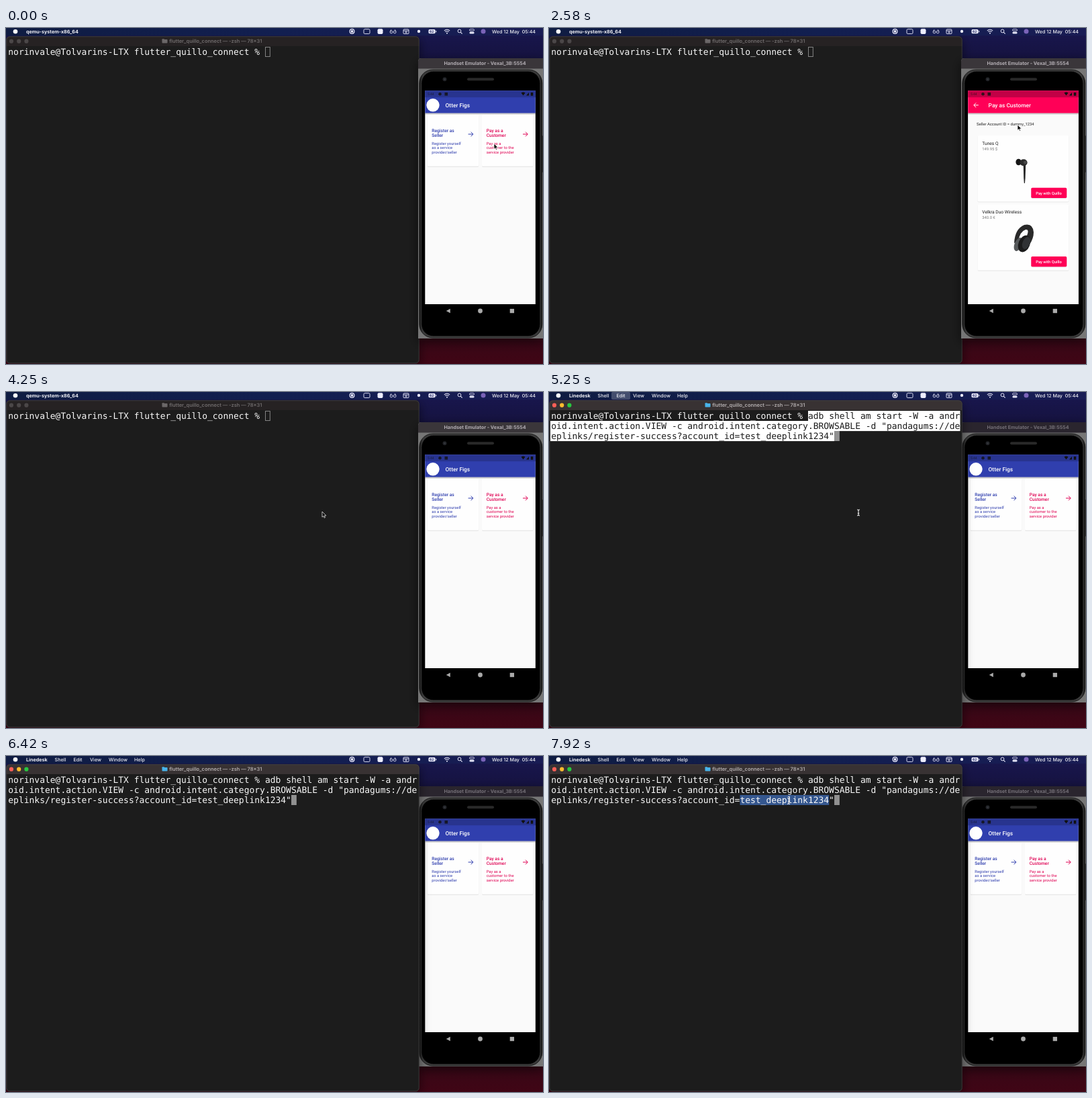
Recreate the animation shown at these times as an HTML page. Size 800 px wide and 500 px high, loop 8 s.

```html
<!DOCTYPE html>
<html lang="en">
<head>
<meta charset="utf-8">
<title>Deep link demo</title>
<style>
  html, body { margin: 0; width: 100%; height: 100%; overflow: hidden; background: #14133f; }
  svg { display: block; width: 800px; height: 500px; }
  text { white-space: pre; text-rendering: geometricPrecision; }
  .ui { font-family: Inter, sans-serif; font-size: 7.2px; font-weight: 500; fill: #f1f1f6; }
  .app { font-family: Roboto, sans-serif; font-size: 5.84px; }
  .mono { font-family: "DejaVu Sans Mono", monospace; font-size: 12.97px; fill: #f8f8f8; }
  .bold { font-weight: 700; }
  .semi { font-weight: 600; }
  .medium { font-weight: 500; }
</style>
</head>
<body>
<svg id="stage" viewBox="0 0 800 500" xmlns="http://www.w3.org/2000/svg">
  <defs>
    <linearGradient id="wall" x2="0" y2="1">
      <stop offset="0" stop-color="#191750"/><stop offset=".1" stop-color="#15123e"/>
      <stop offset=".9" stop-color="#340817"/><stop offset="1" stop-color="#400515"/>
    </linearGradient>
    <linearGradient id="menuFill">
      <stop offset="0" stop-color="#0f1c42"/><stop offset=".5" stop-color="#121f50"/><stop offset="1" stop-color="#191c54"/>
    </linearGradient>
    <linearGradient id="metal">
      <stop offset="0" stop-color="#161616"/><stop offset=".03" stop-color="#3a3a3a"/>
      <stop offset=".97" stop-color="#3a3a3a"/><stop offset="1" stop-color="#161616"/>
    </linearGradient>
    <linearGradient id="barShade" x2="0" y2="1">
      <stop offset="0" stop-opacity=".3"/><stop offset="1" stop-opacity="0"/>
    </linearGradient>
    <filter id="cardShade" x="-10%" y="-10%" width="120%" height="120%">
      <feDropShadow dx="0" dy=".5" stdDeviation=".7" flood-opacity=".2"/>
    </filter>
    <filter id="windowShade" x="-10%" y="-10%" width="125%" height="120%">
      <feDropShadow dx="0" dy="5" stdDeviation="8" flood-opacity=".55"/>
    </filter>
    <clipPath id="screenClip"><rect x="624.3" y="93.3" width="164.5" height="317.7"/></clipPath>
  </defs>
  <rect width="800" height="500" fill="url(#wall)"/>
  <g id="windows"><g id="shellWindow"></g><g id="phoneWindow"></g></g>
  <g id="menu"></g>
  <g id="arrow"><path d="M0 0V8.2L1.9 6.5 3.2 9.3 4.5 8.7 3.2 6H5.9Z" fill="#050505" stroke="#fff" stroke-width=".7" stroke-linejoin="round"/></g>
  <g id="beam" fill="none">
    <path d="M-2-4.5Q0-4.5 0-3V3Q0 4.5-2 4.5M2-4.5Q0-4.5 0-3M0 3Q0 4.5 2 4.5M-1.2 1H1.2" stroke="#eee" stroke-width="1.1"/>
  </g>
</svg>
<script>
const LOOP = 8000;
const CELL = 7.81, ROW = 15, LEFT = 3.3, TOP = 28;
const INDIGO = '#303fae', PINK = '#ff0057';
const PROMPT = 'norinvale@Tolvarins-LTX flutter_quillo_connect % ';
const COMMAND = [
  'adb shell am start -W -a andr',
  'oid.intent.action.VIEW -c android.intent.category.BROWSABLE -d "pandagums://de',
  'eplinks/register-success?account_id=test_deeplink1234"'
];
const AT = {
  openPay: 500, closePay: 3250, slide: 300, focus: 4580, paste: 5170,
  flashEnd: 5340, settle: 5920, beamBack: 6700, select: 7400
};
// time, x, y of the pointer
const POINTER = [
  [0, 727, 172], [700, 727, 172], [1200, 730, 171], [1700, 730, 171],
  [2400, 698, 144], [2700, 698, 144], [3100, 635, 113], [3400, 635, 113],
  [4100, 471, 178], [4300, 471, 178], [4550, 461, 179.5], [6700, 461, 179.5], [7250, 357, 67]
];

const $ = id => document.getElementById(id);
const rect = (x, y, w, h, fill, more = '') =>
  `<rect x="${x}" y="${y}" width="${w}" height="${h}" fill="${fill}" ${more}/>`;
const circle = (x, y, r, fill, more = '') => `<circle cx="${x}" cy="${y}" r="${r}" fill="${fill}" ${more}/>`;
const line = (d, color, width = 1) => `<path d="${d}" fill="none" stroke="${color}" stroke-width="${width}"/>`;
const text = (x, y, str, cls, more = '') => `<text x="${x}" y="${y}" class="${cls}" ${more}>${str}</text>`;
const fill = color => `fill="${color}"`;
const show = (id, on) => { $(id).style.display = on ? '' : 'none'; };

function menuBar() {
  const items = [['Shell', 72.5], ['Edit', 100.5], ['View', 125], ['Window', 153], ['Help', 191]];
  const w = '#eef';
  return rect(0, 0, 800, 11.3, 'url(#menuFill)') + circle(14, 5.2, 3.3, '#fff') +
    `<g id="idleMenu">${text(30, 7.8, 'qemu-system-x86_64', 'ui bold')}</g>
     <g id="shellMenu">${rect(93, 0, 28, 11.3, '#fff', 'id="editFlash" rx="2" opacity=".22"')}
     ${text(30, 7.8, 'Linedesk', 'ui bold')}${items.map(([s, x]) => text(x, 7.8, s, 'ui')).join('')}</g>` +
    circle(515.5, 5, 3.4, 'none', `stroke="${w}" stroke-width="1.2"`) + rect(513.8, 3.3, 3.4, 3.4, w, 'rx=".8"') +
    rect(533, 1.8, 9, 6.8, 'none', `rx="1.5" stroke="${w}" stroke-width=".9"`) +
    rect(553.5, 1.3, 8, 7.6, w, 'rx="2"') +
    circle(574, 6, 1.9, 'none', `stroke="${w}" stroke-width=".8"`) + circle(579.2, 6, 1.9, 'none', `stroke="${w}" stroke-width=".8"`) +
    line('M572.3 5L574 2.2M580.9 5L579.2 2.2', w, .8) +
    rect(592, 2, 8, 6.6, 'none', `rx="1" stroke="${w}" stroke-width=".9"`) + line('M592 4H600M594 6H598M596 4.5V8', w, .8) +
    circle(615, 5, 2.2, w) +
    rect(629.5, 2, 10, 6.3, w, 'rx="1.6"') + rect(640.2, 4, 1, 2.4, w) +
    text(631, 7, '62', 'ui bold', 'style="font-size:5px;fill:#1a205a"') +
    line('M652.8 4.1Q657 .5 661.2 4.1M654.4 5.9Q657 3.7 659.6 5.9', w, 1.1) + circle(657, 7.8, 1, w) +
    circle(675.5, 4.5, 2.4, 'none', `stroke="${w}"`) + line('M677.3 6.3L679.6 8.6', w, 1.1) +
    rect(690.5, 1.8, 7, 2.6, 'none', `rx="1.3" stroke="${w}" stroke-width=".8"`) + rect(690.5, 5.7, 7, 2.9, w, 'rx="1.4"') +
    circle(711, 5, 3.5, '#7a63b8') +
    text(724, 7.6, 'Wed 12 May  05:44', 'ui', 'style="font-size:7.1px"');
}

function shellWindow() {
  const row = i => TOP + ROW * i;
  const base = i => row(i) + 11.6;
  const start = LEFT + PROMPT.length * CELL;
  const endX = LEFT + COMMAND[2].length * CELL;
  const lights = colors => colors.map((c, i) => circle(8 + 11.2 * i, 19.7, 3.1, c)).join('');
  const title = color => rect(232.5, 17, 8, 5.6, color, 'rx=".8"') + rect(232.5, 16.2, 3.5, 2, color, 'rx=".6"');
  const name = color => text(243.2, 22.2, 'flutter_quillo_connect — -zsh — 78×31', 'ui semi', `style="font-size:7.45px;fill:${color}"`);
  const commandX = i => i ? LEFT : start;
  return rect(.5, 12.5, 615, 486.5, '#1b1b1b', 'rx="5" filter="url(#windowShade)"') +
    `<g id="titleIdle"><path d="M.5 27V17.5Q.5 12.5 5.5 12.5H610.5Q615.5 12.5 615.5 17.5V27Z" fill="#262223"/>
      ${lights(['#4b4748', '#4b4748', '#4b4748'])}${title('#6b6768')}${name('#716d6e')}</g>
    <g id="titleActive"><path d="M.5 27V17.5Q.5 12.5 5.5 12.5H610.5Q615.5 12.5 615.5 17.5V27Z" fill="#383233"/>
      ${lights(['#fe5f57', '#febc2e', '#28c840'])}${title('#48b4ea')}${name('#b5b0b1')}</g>` +
    rect(.8, 12.8, 614.4, 486, 'none', 'rx="5" stroke="#484848" stroke-width=".7"') +
    `<g id="paste">${COMMAND.map((s, i) => rect(commandX(i) - (i ? 1.3 : 0), row(i), s.length * CELL + (i ? 1.3 : 0), ROW + .1, '#fff')).join('')}</g>` +
    rect(LEFT + 36 * CELL, row(2), 17 * CELL, ROW, '#35578f', 'id="selection"') +
    text(LEFT, base(0), PROMPT, 'mono') +
    `<g id="command">${COMMAND.map((s, i) => text(commandX(i), base(i), s, 'mono', 'style="fill:inherit"')).join('')}</g>` +
    rect(start + .5, row(0) + .5, CELL - 1, ROW - 1, 'none', 'id="caretIdle" stroke="#858585"') +
    rect(start, row(0), CELL, ROW, '#919191', 'id="caretStart"') +
    rect(endX, row(2), CELL, ROW, '#919191', 'id="caretEnd"');
}

function appBar(color, dark, title) {
  return rect(624, 126.5, 165, 3, 'url(#barShade)') + rect(624, 93, 165, 33.6, color) + rect(624, 93, 165, 10.2, dark) +
    text(628, 100.2, '5:44', 'app', 'style="font-size:5px" fill="#111" opacity=".65"') +
    circle(646.5, 98.3, 2.3, '#111', 'opacity=".8"') + rect(653.5, 96, 4.6, 4.6, '#111', 'opacity=".8"') +
    '<path d="M767.5 96.4Q770.5 94.6 773.5 96.4L770.5 100.6ZM775 100.6L779 96V100.6Z" fill="#111"/>' +
    rect(781.8, 96, 3.4, 4.8, '#111', 'rx=".5"') +
    text(654.6, 118, title, 'app medium', 'style="font-size:8.35px" fill="#fff"');
}

const card = (x, y, w, h) => rect(x, y, w, h, '#fefefe', 'rx="1.6" filter="url(#cardShade)"');

function choice(x, color, title, note) {
  const ax = x + 65;
  return card(x, 128.5, 76.5, 77.3) +
    title.map((s, i) => text(x + 6.7, 154.5 + 7.8 * i, s, 'app medium', `style="font-size:6.67px" ${fill(color)}`)).join('') +
    note.map((s, i) => text(x + 6.7, 173.6 + 6.8 * i, s, 'app', fill(color))).join('') +
    line(`M${ax - 4} 158H${ax + 3}M${ax} 154.7L${ax + 3.3} 158 ${ax} 161.3`, color, 1);
}

function product(y, name, price, art) {
  return card(638.5, y, 136, 98.2) +
    text(645.3, y + 13.6, name, 'app', 'style="font-size:6.67px" fill="#1c1c1c"') +
    text(645.3, y + 22, price, 'app', fill('#777')) + art +
    rect(718.3, y + 77.8, 53, 15.2, PINK, 'rx="1.7" filter="url(#cardShade)"') +
    text(725.2, y + 87.7, 'Pay with Quillo', 'app medium', fill('#fff'));
}

function phoneWindow() {
  const buds = '<path d="M706.7 203H710.2L709.6 223 708.9 231H707.8L707.2 223Z" fill="#262626"/>' +
    '<ellipse cx="699.5" cy="199.5" rx="4.1" ry="4.8" fill="#161616"/>' +
    '<ellipse cx="707" cy="200.2" rx="5.6" ry="5" fill="#2b2b2b"/>' + circle(709.3, 200, 2.4, '#484848');
  const headset = '<path d="M693 320Q694 299 708 293Q721 290 722 304Q722 313 716 322L712 309Q716 299 710 300Q701 303 699 318Z" fill="#292929"/>' +
    '<ellipse cx="699" cy="322" rx="5.5" ry="10.5" fill="#55585a" transform="rotate(22 699 322)"/>' +
    '<ellipse cx="708" cy="321" rx="8.5" ry="13" fill="#1b1b1b" transform="rotate(22 708 321)"/>' +
    '<ellipse cx="711" cy="320" rx="5.5" ry="9.5" fill="#303234" transform="rotate(22 711 320)"/>';
  return '<path d="M614 462V50Q614 45 619 45H800V462Z" fill="#767676" filter="url(#windowShade)"/>' +
    '<path d="M614 60.5V50Q614 45 619 45H800V60.5Z" fill="#3a363a" id="phoneBar"/>' +
    text(652.5, 54.8, 'Handset Emulator - Vexal_3B:5554', 'ui bold', 'id="phoneTitle" style="font-size:7.2px"') +
    rect(797, 160, 2.8, 55, '#303030', 'rx="1"') +
    rect(615.8, 62, 183, 399, 'url(#metal)', 'rx="20" stroke="#111" stroke-width=".8"') +
    rect(618.8, 64.3, 177, 394.5, '#000', 'rx="18" stroke="#505050" stroke-width=".5"') +
    circle(653.5, 76.3, 3, '#202226') + circle(653.5, 76.3, 1.4, '#34363c') + rect(687, 74.3, 40, 4, '#292929', 'rx="2"') +
    `<g clip-path="url(#screenClip)">${rect(624, 93, 165, 318, '#fafafa')}
      ${choice(627.6, INDIGO, ['Register as', 'Seller'], ['Register yourself', 'as a service', 'provider/seller'])}
      ${choice(709, '#df0052', ['Pay as a', 'Customer'], ['Pay as a', 'customer to the', 'service provider'])}
      ${appBar(INDIGO, '#28348f', 'Otter Figs')}${circle(636, 114.8, 9.7, '#fff')}
      <g id="payPage">${rect(624, 93, 165, 318, '#fafafa')}
      ${text(637, 144.8, 'Seller Account ID = dummy_1234', 'app', fill('#222'))}
      ${product(160, 'Tunes Q', '149.95 $', buds)}${product(262.3, 'Velkra Duo Wireless', '340.0 €', headset)}
      ${appBar(PINK, '#c20046', 'Pay as Customer')}
      ${line('M639.8 114.8H633M636.2 111.4L632.8 114.8 636.2 118.2', '#fff', 1)}</g></g>` +
    '<path d="M661.8 417.7V424.3L655.8 421Z" fill="#aaa"/>' + circle(706.5, 421, 3.4, '#aaa') + rect(750.7, 417.9, 6.3, 6.3, '#aaa');
}

const clamp = v => Math.max(0, Math.min(1, v));
const smooth = v => v * v * (3 - 2 * v);

function pointerAt(t) {
  const next = POINTER.findIndex(p => p[0] > t);
  if (next < 0) return POINTER[POINTER.length - 1].slice(1);
  const [t0, x0, y0] = POINTER[next - 1], [t1, x1, y1] = POINTER[next];
  const k = smooth((t - t0) / (t1 - t0));
  return [x0 + (x1 - x0) * k, y0 + (y1 - y0) * k];
}

let shellInFront = null;
function focusShell(on) {
  if (on === shellInFront) return;
  shellInFront = on;
  $('windows').append($(on ? 'shellWindow' : 'phoneWindow'));
  for (const id of ['idleMenu', 'titleIdle', 'caretIdle']) show(id, !on);
  for (const id of ['shellMenu', 'titleActive']) show(id, on);
  $('phoneTitle').style.fill = on ? '#757078' : '#b3aeb4';
  $('phoneBar').style.fill = on ? '#2a252e' : '#3a363a';
}

function draw(t) {
  const focused = t >= AT.focus, pasted = t >= AT.paste;
  const marked = pasted && t < AT.settle;
  focusShell(focused);
  show('editFlash', pasted && t < AT.flashEnd);
  show('paste', marked);
  show('command', pasted);
  $('command').style.fill = marked ? '#1b1b1b' : '#f8f8f8';
  show('caretStart', focused && !pasted);
  show('caretEnd', pasted);
  show('selection', t >= AT.select);

  const shown = clamp((t - AT.openPay) / AT.slide) - clamp((t - AT.closePay) / AT.slide);
  show('payPage', shown > 0);
  $('payPage').style.opacity = smooth(shown);
  $('payPage').setAttribute('transform', `translate(0 ${80 * (1 - shown) ** 2})`);

  const at = `translate(${pointerAt(t).join(' ')})`;
  show('arrow', !focused);
  show('beam', focused && (t < AT.settle || t >= AT.beamBack));
  $('arrow').setAttribute('transform', at);
  $('beam').setAttribute('transform', at);
}

$('shellWindow').innerHTML = shellWindow();
$('phoneWindow').innerHTML = phoneWindow();
$('menu').innerHTML = menuBar();
const began = performance.now();
function tick() {
  draw((performance.now() - began) % LOOP);
  requestAnimationFrame(tick);
}
tick();
</script>
</body>
</html>
```
